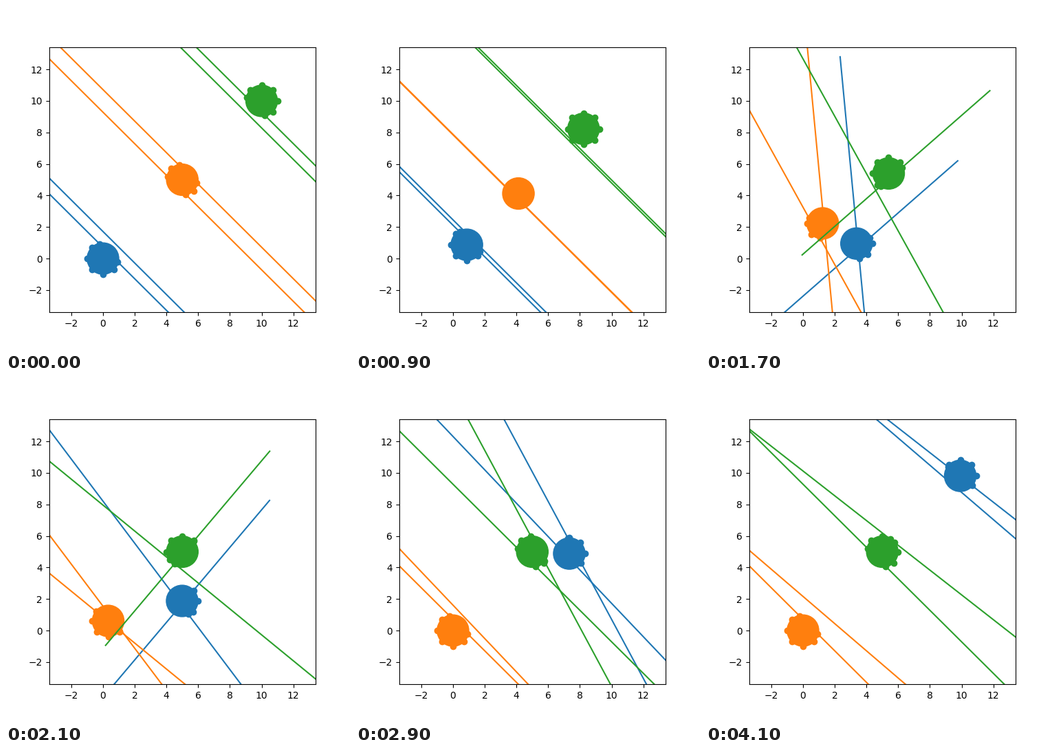
A matplotlib script for the animation above (4300 ms loop, 500 px wide and 500 px high).

```python
import numpy as np
import matplotlib.pyplot as plt
from matplotlib.animation import FuncAnimation

# Three discs swap places, avoiding each other with reciprocal velocity planes.
RADIUS = 1.0
HORIZON = 5.0
STEPS = 20
START = np.array([[0, 0], [5, 5], [10, 10]], float)
GOAL = np.array([[10, 10], [0, 0], [5, 5]], float)
COLORS = ["C0", "C1", "C2"]

angles = np.arange(8) * np.pi / 4
OCTAGON = [np.array([np.cos(a), np.sin(a)]) for a in angles]


def cross(a, b):
    return a[0] * b[1] - a[1] * b[0]


def rotate(v, angle):
    c, s = np.cos(angle), np.sin(angle)
    return np.array([c * v[0] - s * v[1], s * v[0] + c * v[1]])


def avoidance_plane(rel, va, vb):
    """Return (n, c): allowed velocities satisfy v . n >= c."""
    reach = 2 * RADIUS
    dist = np.hypot(*rel)
    v = va - vb
    w = v - rel / HORIZON
    along = w @ rel
    if along < 0 and along ** 2 > reach ** 2 * (w @ w):
        size = np.hypot(*w)
        n = w / size
        push = reach / HORIZON - size
    else:
        half = np.arcsin(min(1.0, reach / dist))
        side = 1 if cross(rel, w) > 1e-9 else -1
        leg = rotate(rel / dist, side * half)
        n = side * np.array([-leg[1], leg[0]])
        push = -(v @ n)
    return n, va @ n + push / 2


def clip(poly, n, c):
    out = []
    for i, b in enumerate(poly):
        a = poly[i - 1]
        da, db = a @ n - c, b @ n - c
        if (da >= -1e-9) != (db >= -1e-9):
            out.append(a + (b - a) * da / (da - db))
        if db >= -1e-9:
            out.append(b)
    return out


def nearest(poly, p):
    """Closest point of a convex counter-clockwise polygon to p."""
    best, best_d, inside = None, np.inf, True
    for i, b in enumerate(poly):
        a = poly[i - 1]
        edge = b - a
        if cross(edge, p - a) < 0:
            inside = False
        t = np.clip((p - a) @ edge / max(edge @ edge, 1e-18), 0, 1)
        q = a + t * edge
        d = np.hypot(*(p - q))
        if d < best_d:
            best, best_d = q, d
    return p if inside else best


def plane_segment(n, c):
    """Unit triangle projected on the line, extended tenfold both ways."""
    d = np.array([-n[1], n[0]])
    lo, hi = min(0, *d), max(0, *d)
    span = 10 * (hi - lo)
    return np.array([c * n + (lo - span) * d, c * n + (hi + span) * d])


def simulate():
    pos, vel = START.copy(), np.zeros((3, 2))
    states = []
    for _ in range(STEPS):
        segments, cells, new_vel = [], [], []
        for i in range(3):
            cell = OCTAGON
            for j in range(3):
                if j == i:
                    continue
                n, c = avoidance_plane(pos[j] - pos[i], vel[i], vel[j])
                segments.append(pos[i] + plane_segment(n, c))
                cell = clip(cell, n, c)
            wish = GOAL[i] - pos[i]
            wish = wish / max(1.0, np.hypot(*wish))
            new_vel.append(nearest(cell or OCTAGON, wish))
            cells.append(np.array([pos[i] + v for v in cell]).reshape(-1, 2))
        states.append((pos.copy(), segments, cells))
        vel = np.array(new_vel)
        pos = pos + vel
    return states


states = simulate()

fig, ax = plt.subplots(figsize=(5, 5), dpi=100)
ax.set_xlim(-3.4, 13.4)
ax.set_ylim(-3.4, 13.4)

discs, dots, lines = [], [], []
for color in COLORS:
    discs.append(ax.add_patch(plt.Circle((0, 0), RADIUS, color=color)))
    dots += ax.plot([], [], "o", color=color)
    for _ in range(2):
        lines += ax.plot([], [], color=color)


def draw(k):
    # The first state holds for five ticks, every other one for two.
    pos, segments, cells = states[max(0, (k - 3) // 2)]
    for disc, dot, p, cell in zip(discs, dots, pos, cells):
        disc.center = tuple(p)
        dot.set_data(cell[:, 0], cell[:, 1])
    for line, seg in zip(lines, segments):
        line.set_data(seg[:, 0], seg[:, 1])
    return discs + dots + lines


anim = FuncAnimation(fig, draw, frames=43, interval=100, repeat=True,
                     repeat_delay=0, init_func=lambda: draw(0))
plt.show()
```
